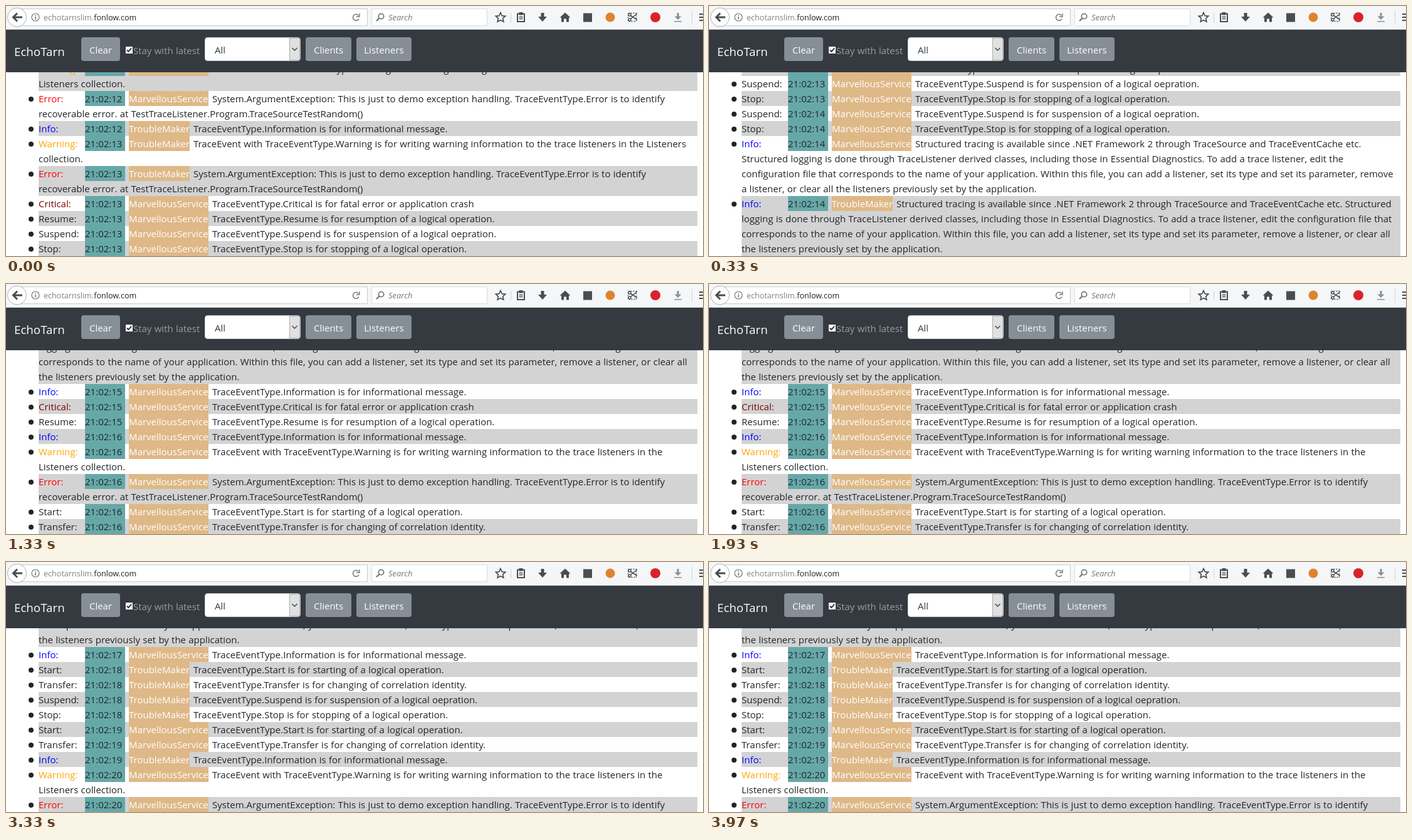
These frames come from a looping animation (1112x400 px, 4390 ms). An HTML page:

```html
<!DOCTYPE html>
<html lang="en">
<head>
<meta charset="utf-8">
<title>EchoTarn</title>
<style>
  html, body { margin: 0; width: 100%; height: 100%; overflow: hidden; background: #fff; }
  body { position: relative; font: 15px/24px "Open Sans", "Noto Sans", sans-serif; word-spacing: .36px; color: #212529; }
  svg { position: absolute; left: 0; top: 0; }
  .log { position: absolute; left: 0; top: 106px; width: 1112px; height: 294px; overflow: hidden; }
  .reel { animation: pages 4390ms step-end infinite; }
  .page { height: 294px; overflow: hidden; }
  ul { list-style: none; margin: 0; padding: 0; }
  li { position: relative; margin-left: 52px; width: 1051px; white-space: pre; }
  li:nth-child(odd) { background: lightgray; }
  li::before {
    content: ""; position: absolute; left: -16px; top: 9px;
    width: 8px; height: 8px; border-radius: 50%; background: #212529;
  }
  li span { display: inline-block; height: 24px; vertical-align: top; }
  .kind { width: 74px; }
  .time { width: 64px; margin-right: 6px; background: #66a8a8; }
  .name { margin-right: 6px; background: burlywood; color: #fff; }
  .m { width: 127px; }
  .t { width: 97px; }
  .Info { color: blue; }
  .Warning { color: orange; }
  .Error { color: red; }
  .Critical { color: maroon; }
  @keyframes pages {
    0% { transform: translateY(0); }
    7.517% { transform: translateY(-294px); }
    30.296% { transform: translateY(-588px); }
    53.075% { transform: translateY(-882px); }
    75.854%, 100% { transform: translateY(-1176px); }
  }
</style>
</head>
<body>
<div class="log"><div class="reel" id="reel"></div></div>

<svg width="1112" height="106" viewBox="0 0 1112 106" font-family="Open Sans, Noto Sans, sans-serif">
  <!-- browser bar -->
  <rect width="1112" height="38" fill="#f5f6f7"/>
  <rect y="37" width="1112" height="1" fill="#c3c5c7"/>
  <g fill="#fff" stroke="#c9cbcd">
    <rect x="20.5" y="4.5" width="556" height="27"/>
    <rect x="583.5" y="4.5" width="184" height="27" stroke="#dcddde"/>
    <circle cx="17.5" cy="18" r="15" stroke="#adb0b3"/>
  </g>
  <path d="M26 18H12M18 11.5L11.5 18L18 24.5" fill="none" stroke="#4a4d50" stroke-width="3"/>
  <g fill="none" stroke="#777" stroke-width="1.2">
    <circle cx="47" cy="18" r="6"/>
    <path d="M47 17V21.5M47 14.2V15.8" stroke-width="1.6"/>
    <path d="M562.5 15.2A5 5 0 1 0 563 20.5" stroke-width="1.6"/>
    <path d="M564 12V17H559" stroke-width="1.4"/>
    <circle cx="598.5" cy="16.5" r="4.2" stroke-width="1.8"/>
    <path d="M595.5 19.5L591 24" stroke-width="2.4"/>
  </g>
  <text x="60" y="23" font-size="12.6" fill="#808080">echotarnslim.<tspan fill="#222">fonlow.com</tspan></text>
  <text x="610" y="23" font-size="13" font-style="italic" fill="#777">Search</text>

  <g fill="none" stroke="#4a4d50" stroke-width="1.7">
    <path d="M789 10.5L791.3 15.6L796.7 16.2L792.7 19.9L793.8 25.2L789 22.5L784.2 25.2L785.3 19.9L781.3 16.2L786.7 15.6Z"/>
    <rect x="816" y="12.5" width="11" height="12.5" stroke-width="2"/>
    <path d="M818.5 17.5H824.5M818.500 20.5H824.500" stroke-width="1.3"/>
    <rect x="992.5" y="11.5" width="13" height="13" stroke-width="1.3" stroke-dasharray="2 2"/>
    <path d="M1007 12L996 21M1007 22L996 15" stroke-width="1.5"/>
    <circle cx="995" cy="14" r="2" stroke-width="1.4"/>
    <circle cx="995" cy="22" r="2" stroke-width="1.4"/>
  </g>
  <g fill="#4a4d50">
    <rect x="818.5" y="10" width="6" height="4.500"/>
    <path d="M853.5 11H858.5V17H863L856 25L849 17H853.5Z"/>
    <path d="M892 10.5L900.5 18.5H898V25.5H894V20.5H890V25.5H886V18.5H883.5Z"/>
    <rect x="921" y="11.5" width="14" height="14"/>
    <path d="M1106 12H1112V14H1106ZM1106 17H1112V19H1106ZM1106 22H1112V24H1106Z"/>
  </g>
  <circle cx="964" cy="18" r="7.5" fill="#de8430"/>
  <circle cx="1036" cy="18" r="8" fill="#d9232b"/>
  <path d="M1070.5 11H1073.5V16.5H1077.5L1072 22L1066.5 16.5H1070.5ZM1066 24H1078V25.5H1066Z" fill="#8d9093"/>
  <path d="M805 11H806V26H805ZM1094 8H1095V30H1094Z" fill="#cfd1d3"/>

  <!-- page header -->
  <rect y="38" width="1112" height="68" fill="#343a40"/>
  <text x="13" y="80" font-size="18.75" fill="#fff">EchoTarn</text>
  <g fill="#868e96">
    <rect x="120" y="50" width="62" height="38" rx="4"/>
    <rect x="478" y="50" width="73" height="38" rx="4"/>
    <rect x="559" y="50" width="88" height="38" rx="4"/>
  </g>
  <g font-size="15" fill="#fff" text-anchor="middle">
    <text x="151" y="76">Clear</text>
    <text x="514.5" y="76">Clients</text>
    <text x="603" y="76">Listeners</text>
  </g>
  <rect x="191" y="65" width="11" height="11" fill="#fff"/>
  <path d="M193 70.5L195.5 73L200 67.5" fill="none" stroke="#222" stroke-width="1.8"/>
  <text x="203" y="77" font-size="15" fill="#999da0">Stay with latest</text>
  <rect x="317.5" y="50.5" width="152" height="37" rx="4" fill="#fff" stroke="#ced4da"/>
  <rect x="452.5" y="51.5" width="16" height="35" fill="#e1e1e1" stroke="#adadad"/>
  <path d="M456.5 67L460.5 71L464.5 67" fill="none" stroke="#444" stroke-width="1.4"/>
  <text x="333" y="76" font-size="15" fill="#343a40">All</text>
</svg>

<script>
  const names = { m: "MarvellousService", t: "TroubleMaker" };
  const op = (type, text) => `TraceEventType.${type} is for ${text}`;
  const messages = {
    Info: op("Information", "informational message."),
    Critical: op("Critical", "fatal error or application crash"),
    Resume: op("Resume", "resumption of a logical operation."),
    Suspend: op("Suspend", "suspension of a logical oepration."),
    Start: op("Start", "starting of a logical operation."),
    Stop: op("Stop", "stopping of a logical operation."),
    Transfer: op("Transfer", "changing of correlation identity."),
    Warning: "TraceEvent with TraceEventType.Warning is for writing warning information to the trace listeners in the Listeners collection.",
    Error: "System.ArgumentException: This is just to demo exception handling. TraceEventType.Error is to identify recoverable error. at TestTraceListener.Program.TraceSourceTestRandom()",
    Guide: "Structured tracing is available since .NET Framework 2 through TraceSource and TraceEventCache etc. Structured logging is done through TraceListener derived classes, including those in Essential Diagnostics. To add a trace listener, edit the configuration file that corresponds to the name of your application. Within this file, you can add a listener, set its type and set its parameter, remove a listener, or clear all the listeners previously set by the application."
  };
  // Words that open a new line, by sender
  const breaks = {
    Warning: { m: ["Listeners coll"], t: ["collection"] },
    Error: { m: ["recoverable"], t: ["recoverable"] },
    Guide: {
      m: ["Structured logging", "configuration", "a listener, or"],
      t: ["logging", "corresponds", "the listeners prev"]
    }
  };
  // Each page: hidden height above the list, then "kind second sender" rows
  const pages = [
    [18, "Warning 12 m,Error 12 m,Info 12 t,Warning 13 t,Error 13 t,Critical 13 m,Resume 13 m,Suspend 13 m,Stop 13 m"],
    [18, "Resume 13 m,Suspend 13 m,Stop 13 m,Suspend 14 m,Stop 14 m,Guide 14 m,Guide 14 t"],
    [42, "Guide 14 t,Info 15 m,Critical 15 m,Resume 15 m,Info 16 m,Warning 16 m,Error 16 m,Start 16 m,Transfer 16 m"],
    [18, "Info 16 t,Warning 16 t,Error 16 t,Critical 16 t,Resume 16 t,Start 16 t,Transfer 16 t,Suspend 16 t,Stop 16 t,Info 17 t,Suspend 17 t"],
    [66, "Guide 17 t,Info 17 m,Start 18 t,Transfer 18 t,Suspend 18 t,Stop 18 t,Start 19 m,Transfer 19 m,Info 19 t,Warning 20 m,Error 20 m"]
  ];

  function wrap(type, who) {
    const starts = breaks[type] ? breaks[type][who] : [];
    return starts.reduce((text, s) => text.replace(" " + s, "\n" + s), messages[type]);
  }

  function row(entry) {
    const [type, sec, who] = entry.split(" ");
    const kind = type === "Guide" ? "Info" : type;
    return `<li><span class="kind ${kind}">${kind}:</span><span class="time">21:02:${sec}</span>` +
      `<span class="name ${who}">${names[who]}</span>${wrap(type, who)}</li>`;
  }

  document.getElementById("reel").innerHTML = pages.map(([hidden, rows]) =>
    `<div class="page"><ul style="margin-top:-${hidden}px">${rows.split(",").map(row).join("")}</ul></div>`
  ).join("");
</script>
</body>
</html>
```
